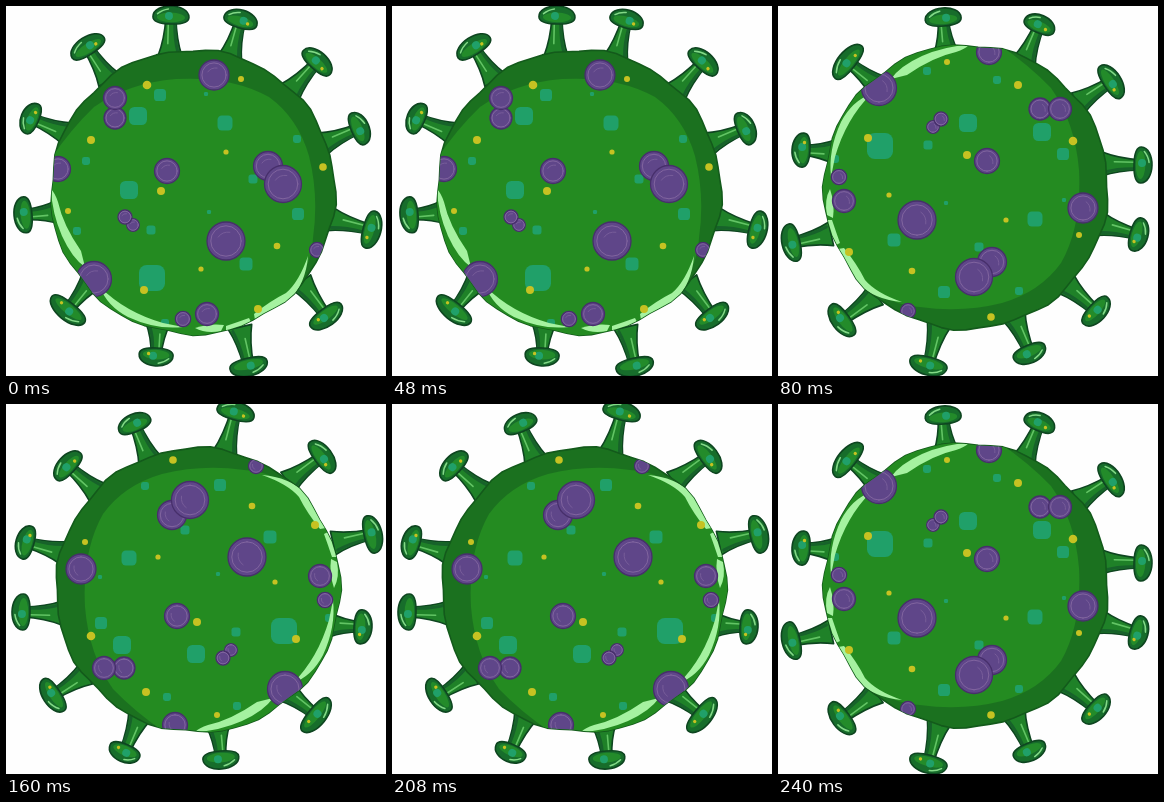
An HTML page that plays this animation: 380x370 px, repeating every 0.32 s.

```html
<!DOCTYPE html>
<html lang="en">
<head>
<meta charset="utf-8">
<title>Spinning virus</title>
<style>
  html, body { margin: 0; width: 100%; height: 100%; overflow: hidden; background: #fefefe; }
  svg { display: block; width: 100vw; height: 100vh; }
</style>
</head>
<body>
<svg viewBox="0 0 380 370">
  <defs>
    <clipPath id="inside"><path id="clipShape"/></clipPath>
  </defs>
  <g id="virus" stroke-linecap="round" stroke-linejoin="round">
    <g id="spikes"></g>
    <path id="body" fill="#1b711f" stroke="#135a1b" stroke-width="1.6"/>
    <g clip-path="url(#inside)">
      <path id="light" fill="#248b21"/>
      <g id="tiles" fill="#20a069"></g>
      <g id="shine" fill="#a5f2a0"></g>
      <g id="dots" fill="#c6c222"></g>
      <g id="spots"></g>
    </g>
  </g>
</svg>
<script>
const $ = id => document.getElementById(id);

function add(parent, tag, attrs) {
  const el = document.createElementNS('http://www.w3.org/2000/svg', tag);
  for (const key in attrs) el.setAttribute(key, attrs[key]);
  return parent.appendChild(el);
}

// Closed, slightly uneven outline of the body
function blob(cx, cy, r) {
  let d = '';
  for (let i = 0; i < 72; i++) {
    const a = i * Math.PI / 36;
    const q = r + 1.1 * Math.sin(9 * a + 1) + 0.8 * Math.sin(17 * a);
    d += (i ? 'L' : 'M') + (cx + q * Math.cos(a)).toFixed(1) + ' ' + (cy + q * Math.sin(a)).toFixed(1);
  }
  return d + 'Z';
}

const outline = blob(187, 186, 142);
$('body').setAttribute('d', outline);
$('clipShape').setAttribute('d', outline);
$('light').setAttribute('d',
  'M40 160Q62 126 88 101Q122 77 170 73Q226 70 263 91Q292 112 303 150Q313 190 307 232Q306 262 280 292L240 335L120 335L30 260Z');

// Spikes: cap x, y, root x, y, half length of the cap
const spikes = [
  [165, 9, 164, 50, 18], [235, 13, 224, 52, 17], [312, 55, 284, 86, 18],
  [354, 122, 316, 138, 17], [366, 224, 324, 213, 19], [321, 311, 295, 276, 19],
  [243, 361, 234, 321, 19], [150, 351, 152, 318, 17], [61, 305, 86, 274, 21],
  [17, 209, 52, 206, 18], [24, 112, 62, 128, 16], [81, 40, 103, 74, 19]
];

spikes.forEach(([x, y, bx, by, h], i) => {
  const len = Math.hypot(bx - x, by - y);
  const turn = Math.atan2(by - y, bx - x) * 180 / Math.PI - 90;
  const g = add($('spikes'), 'g', { transform: `translate(${x} ${y}) rotate(${turn})` });
  const ink = { stroke: '#0e4520', 'stroke-width': 1.6 };
  add(g, 'path', {
    d: `M-5 2Q-6 ${len * 0.6} -12 ${len}H12Q6 ${len * 0.6} 5 2Z`, fill: '#1f8128', ...ink
  });
  add(g, 'path', {
    d: `M4 8Q4 ${len * 0.6} 8 ${len - 3}`, fill: 'none', stroke: '#17622a', 'stroke-width': 3
  });
  add(g, 'path', { d: `M-2.5 9V${len * 0.7}`, fill: 'none', stroke: '#62c464', 'stroke-width': 1.6 });
  add(g, 'path', {
    d: `M${-h} 2C${-h} -5 ${-h * 0.5} -9 0 -9S${h} -5 ${h} 2C${h} 8 ${h * 0.5} 9 0 9S${-h} 8 ${-h} 2Z`,
    fill: '#176d2b', ...ink
  });
  add(g, 'ellipse', { cx: 0, cy: 2.4, rx: h * 0.78, ry: 4.8, fill: '#238b2a' });
  add(g, 'circle', { cx: i % 2 ? 3 : -2, cy: 1, r: 4, fill: '#20a069' });
  add(g, 'path', {
    d: `M${-h * 0.75} -1Q${-h * 0.5} -5 ${-h * 0.15} -6`, fill: 'none',
    stroke: '#83d987', 'stroke-width': 1.5
  });
  if (i % 3) add(g, 'circle', { cx: h * 0.45, cy: 3, r: 1.7, fill: '#c6c222' });
});

// Teal patches: x, y, side
[
  [132, 110, 18], [154, 89, 12], [219, 117, 15], [123, 184, 18], [146, 272, 26],
  [240, 258, 13], [292, 208, 12], [145, 224, 9], [71, 225, 8], [80, 155, 8],
  [291, 133, 8], [247, 173, 9], [200, 88, 4], [203, 206, 4], [159, 317, 8]
].forEach(([x, y, s]) => add($('tiles'), 'rect', {
  x: x - s / 2, y: y - s / 2, width: s, height: s, rx: s * 0.3
}));

[
  'M45 183Q49 187 52 196Q57 219 75 245L79 261Q66 252 56 230Q46 207 45 183Z',
  'M94 281Q119 306 157 317L177 321Q150 324 122 311Q101 300 94 281Z',
  'M189 322Q204 317 218 319L215 325Q200 328 189 322Z',
  'M220 320Q232 316 243 312L245 316Q233 323 220 325Z',
  'M248 308Q264 295 280 287Q293 276 302 250Q300 277 283 295Q267 309 249 314Z'
].forEach(d => add($('shine'), 'path', { d }));

// Yellow dots: x, y, radius
[
  [141, 79, 4.3], [85, 134, 4], [235, 73, 3], [220, 146, 2.6], [317, 161, 3.8], [155, 185, 4],
  [62, 205, 3], [271, 240, 3.3], [195, 263, 2.6], [138, 284, 4], [252, 303, 4]
].forEach(([cx, cy, r]) => add($('dots'), 'circle', { cx, cy, r }));

// Purple spots: x, y, radius
[
  [208, 69, 15.5], [109, 112, 11.5], [109, 92, 12], [161, 165, 13], [262, 160, 15], [277, 178, 19],
  [220, 235, 19.5], [127, 219, 6.8], [119, 211, 7.5], [52, 163, 13], [88, 273, 18],
  [177, 313, 8.2], [201, 308, 12], [311, 244, 8]
].forEach(([cx, cy, r]) => {
  add($('spots'), 'circle', { cx, cy, r: r - 0.5, fill: '#5f4689', stroke: '#472f6b', 'stroke-width': 1.3 });
  add($('spots'), 'circle', { cx, cy, r: r * 0.78, fill: 'none', stroke: '#81659f', 'stroke-width': 1 });
  add($('spots'), 'path', {
    d: `M${cx - r * 0.4} ${cy - r * 0.2}Q${cx - r * 0.2} ${cy - r * 0.5} ${cx + r * 0.2} ${cy - r * 0.45}`,
    fill: 'none', stroke: '#7a5f9b', 'stroke-width': 0.9
  });
});

const STEP = 80;
const poses = ['', 'rotate(90 190 184)', 'rotate(-90 189.5 183.5)', 'rotate(90 190 184)'];

function draw(ms) {
  $('virus').setAttribute('transform', poses[Math.floor(ms / STEP) % poses.length]);
}

let start;
function tick(now) {
  start ??= now;
  draw(now - start);
  requestAnimationFrame(tick);
}
draw(0);
requestAnimationFrame(tick);
</script>
</body>
</html>
```
